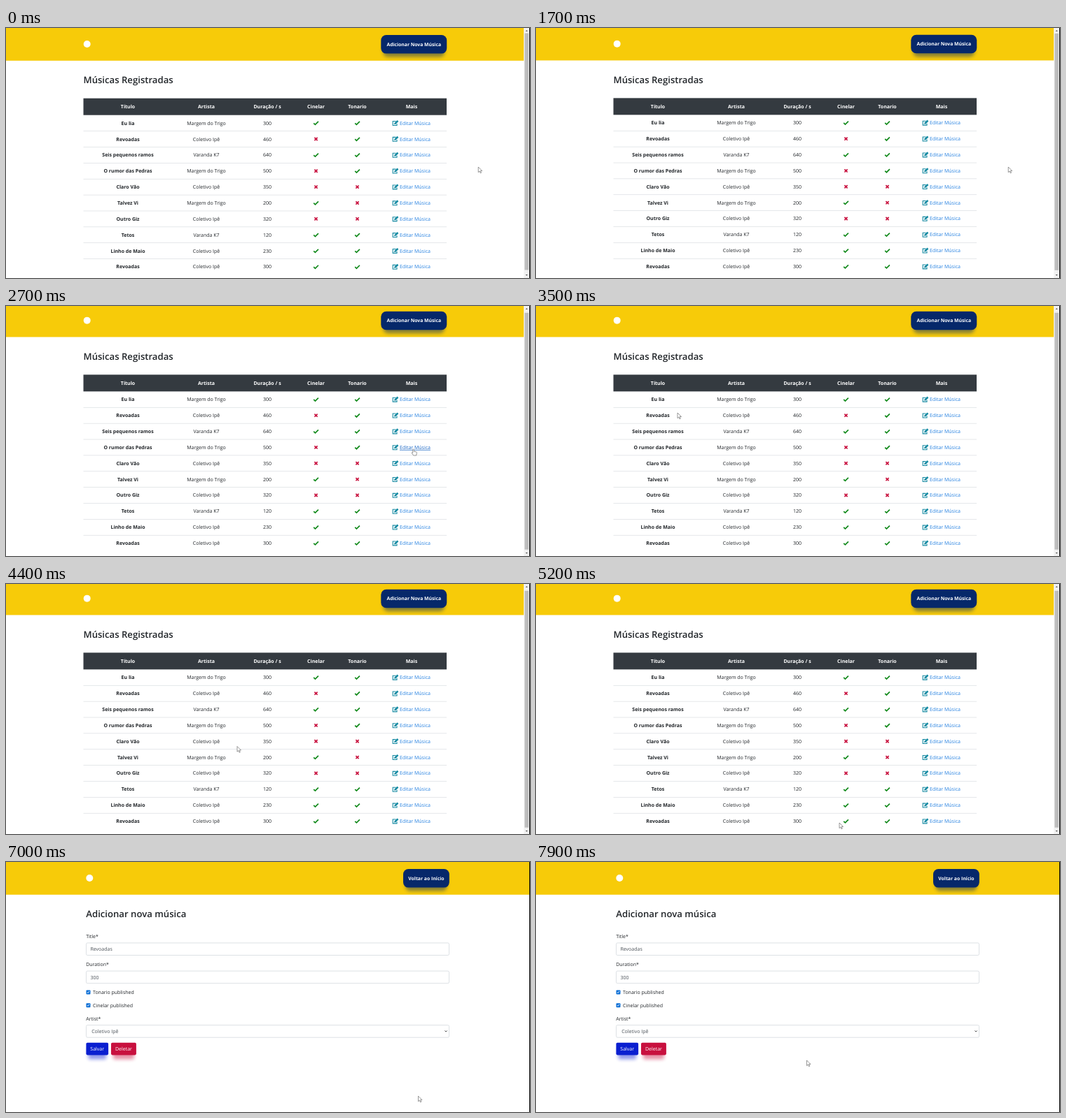
Write an HTML page that moves like this. It is 748 by 358 pixels and loops after 8 s.

```html
<!DOCTYPE html>
<html lang="pt">
<head>
<meta charset="utf-8">
<title>Músicas Registradas</title>
<style>
  html, body { margin: 0; width: 100%; height: 100%; overflow: hidden; background: #fff; }
  svg { display: block; width: 748px; height: 358px; font: 7px "Open Sans", "Noto Sans", sans-serif; fill: #212529; text-rendering: geometricPrecision; }
  .b { font-weight: 700; }
  .h { font-size: 13.15px; font-weight: 600; }
  .cta { font-size: 6.8px; font-weight: 700; }
  .m { text-anchor: middle; }
  .w { fill: #fff; }
  .link { fill: #2580e0; }
  .hover { fill: #1a66c4; text-decoration: underline; }
  .field { fill: #fff; stroke: #ced4da; stroke-width: .7; }
  .grey { fill: #495057; }
  .ok { fill: none; stroke: #128a1c; stroke-width: 1.7; }
  .no { fill: none; stroke: #c8103e; stroke-width: 1.7; }
  .edit { fill: none; stroke: #178ba3; stroke-width: 1.1; }
  .pen { fill: #178ba3; }
  .ptr { fill: #fff; stroke: #555; stroke-width: .6; stroke-linejoin: round; }
</style>
</head>
<body>
<svg viewBox="0 0 748 358">
  <defs>
    <filter id="soft" x="-30%" y="-50%" width="160%" height="220%"><feGaussianBlur stdDeviation="2.6"/></filter>
  </defs>
  <g id="list"></g>
  <g id="form"></g>
  <rect x="747" width="1" height="358" fill="#000"/>
  <g id="cursor">
    <path id="arrow" class="ptr" d="M0 0V7.7L1.8 6 3 8.8 4.3 8.2 3.1 5.5H5.5Z"/>
    <path id="hand" class="ptr" d="M-.8 .7Q0-.4 .8 .7V3.4L4 4.1Q5 4.4 4.9 5.5L4.2 9.2H.2L-2.4 5.6Q-2.2 4.4-.8 5.5Z"/>
  </g>
</svg>
<script>
const $ = id => document.getElementById(id);
const LOOP = 8000, OPEN = 7000;
const ROW = 22.87, TOP = 124.7;
const COLS = [174, 286, 373, 442.5, 501.5, 579];
const bands = ["Margem do Trigo", "Coletivo Ipê", "Varanda K7"];
// title, band, seconds, on video site, on audio site
const songs = [
  ["Eu lia", 0, 300, 1, 1], ["Revoadas", 1, 460, 0, 1],
  ["Seis pequenos ramos", 2, 640, 1, 1], ["O rumor das Pedras", 0, 500, 0, 1],
  ["Claro Vão", 1, 350, 0, 0], ["Talvez Vi", 0, 200, 1, 0],
  ["Outro Giz", 1, 320, 0, 0], ["Tetos", 2, 120, 1, 1],
  ["Linho de Maio", 1, 230, 1, 1], ["Revoadas", 1, 300, 1, 1]
];

const text = (x, y, s, cls = "", extra = "") => `<text x="${x}" y="${y}" class="${cls}" ${extra}>${s}</text>`;
const rect = (x, y, w, h, fill, extra = "") => `<rect x="${x}" y="${y}" width="${w}" height="${h}" fill="${fill}" ${extra}/>`;
const path = (x, y, cls, d) => `<path class="${cls}" transform="translate(${x} ${y})" d="${d}"/>`;
const mark = (x, y, on) => on
  ? path(x, y, "ok", "M-3.3 .2L-1.1 2.3 3.4-2.2")
  : path(x, y, "no", "M-2.1-2.1L2.1 2.1M2.1-2.1L-2.1 2.1");
const editIcon = (x, y) => path(x, y, "edit", "M.6-2.6H-3.8V3.3H2V.9") +
  path(x, y, "pen", "M-1.9 1.8L-1.6-.1 2.5-4.2 4.4-2.3 .3 1.6Z");

function button(x, y, w, h, r, fill, label, cls, dy) {
  return rect(x + 3, y + dy, w - 6, h, fill, `rx="${r}" opacity=".45" filter="url(#soft)"`) +
    rect(x, y, w, h, fill, `rx="${r}"`) +
    text(x + w / 2, y + h / 2 + 2.5, label, "w m " + cls);
}

function header(width, x, bx, label) {
  return rect(0, -4, width, 50.8, "#f7cb09") +
    `<circle cx="${x + 5}" cy="23" r="5" fill="#fff"/>` +
    button(bx, 10.1, x + 518.5 - bx, 26.5, 7.5, "#06286a", label, "cta", 5);
}

function listPage() {
  const heads = ["Título", "Artista", "Duração / s", "Cinelar", "Tonario", "Mais"];
  let s = `<g id="page">` + header(739.3, 110.7, 535.3, "Adicionar Nova Música") +
    text(110.5, 79.1, "Músicas Registradas", "h") +
    rect(110.5, 100.7, 518.5, 24, "#343a40");
  heads.forEach((t, i) => s += text(COLS[i], 115.4, t, "b m w"));
  songs.forEach(([title, band, secs, video, audio], i) => {
    const y = TOP + ROW * (i + .5), base = y + 2.5;
    if (i) s += rect(110.5, y - ROW / 2 - .25, 518.5, .6, "#d4d8dc");
    s += text(COLS[0], base, title, "b m") + text(COLS[1], base, bands[band], "m") +
      text(COLS[2], base, secs, "m") + mark(COLS[3], y, video) + mark(COLS[4], y, audio) +
      editIcon(556, y) + text(562, base, "Editar Música", "link", `id="link${i}"`);
  });
  return s + "</g>" + rect(739.3, 0, 7.7, 358, "#f1f1f1") +
    `<rect id="thumb" x="740.4" y="7.5" width="5.6" height="339" fill="#bdbdbd"/>` +
    `<path d="M741.6 4.8L743.2 3 744.8 4.8ZM741.6 353L743.2 354.8 744.8 353Z" fill="#505050"/>`;
}

function formPage() {
  const x = 114.5;
  const field = (y, value, dx) => rect(x, y, 518, 17.6, "#fff", `class="field" rx="1.8"`) +
    text(x + dx, y + 11.4, value, "grey");
  const check = (y, label) => rect(x, y - 3, 6, 6, "#0b6fd6", `rx="1"`) +
    path(x + 3, y, "w", "M-1.9 .1L-.6 1.5 2-1.3 1.5-1.8-.6 .5-1.4-.4Z") +
    text(124, y + 2.7, label);
  return rect(0, 0, 748, 358, "#fff") + header(747, 114.3, 567, "Voltar ao Início") +
    text(114.3, 79.1, "Adicionar nova música", "h") +
    text(x - .3, 109, "Title*") + field(115.9, "Revoadas", 6) +
    text(x - .3, 149.3, "Duration*") + field(156.1, "300", 6) +
    check(186.5, "Tonario published") + check(205.2, "Cinelar published") +
    text(x - .3, 226.8, "Artist*") + field(233.6, bands[1], 7.7) +
    `<path d="M626.4 241.5L628 243.1 629.6 241.5" fill="none" stroke="#333" stroke-width=".9"/>` +
    button(114.4, 258.8, 31.7, 17.6, 1.8, "#0a1fd0", "Salvar", "", 6) +
    button(150, 258.8, 35.9, 17.6, 1.8, "#c8103e", "Deletar", "", 6);
}

$("list").innerHTML = listPage();
$("form").innerHTML = formPage();

// time, x, y of the pointer tip
const route = [
  [2400, 674.2, 199], [2600, 610, 204], [2700, 581.5, 204.8], [2800, 560, 190],
  [3000, 330, 140], [3200, 192, 122], [3300, 192, 122], [3500, 202, 153],
  [3700, 188, 325], [3900, 284, 122], [4000, 284, 122], [4300, 290, 340],
  [4500, 370, 125], [4600, 370, 125], [4900, 376, 340], [5000, 438, 130],
  [5200, 433, 342], [5300, 496, 130], [5400, 502, 335], [5500, 578, 133],
  [6000, 588.5, 335.2], [7600, 588.5, 335.2], [7700, 545, 322], [7800, 440, 297], [7900, 386.5, 284]
];
const scrollSteps = [[1600, 0], [2000, 1.4], [2200, 2.35]];

function at(steps, t) {
  const i = steps.findIndex(s => s[0] > t);
  if (i === 0) return steps[0].slice(1);
  if (i < 0) return steps[steps.length - 1].slice(1);
  const a = steps[i - 1], b = steps[i], k = (t - a[0]) / (b[0] - a[0]);
  return a.slice(1).map((v, n) => v + (b[n + 1] - v) * k);
}

function draw(now) {
  const t = Math.floor(now % LOOP / 100) * 100;
  const [x, y] = at(route, t), [scroll] = at(scrollSteps, t);
  const onForm = t >= OPEN;
  $("list").style.display = onForm ? "none" : "";
  $("form").style.display = onForm ? "" : "none";
  $("page").setAttribute("transform", `translate(0 ${-scroll})`);
  $("thumb").setAttribute("y", 7.5 + scroll * .95);
  let over = false;
  songs.forEach((_, i) => {
    const mid = TOP + ROW * (i + .5) - scroll;
    const hit = !onForm && x > 551 && x < 607 && Math.abs(y - mid) < 5.2;
    $("link" + i).setAttribute("class", hit ? "link hover" : "link");
    over = over || hit;
  });
  $("hand").style.display = over ? "" : "none";
  $("arrow").style.display = over ? "none" : "";
  $("cursor").setAttribute("transform", `translate(${x} ${y})`);
}

const start = performance.now();
function tick() {
  draw(performance.now() - start);
  requestAnimationFrame(tick);
}
tick();
</script>
</body>
</html>
```
